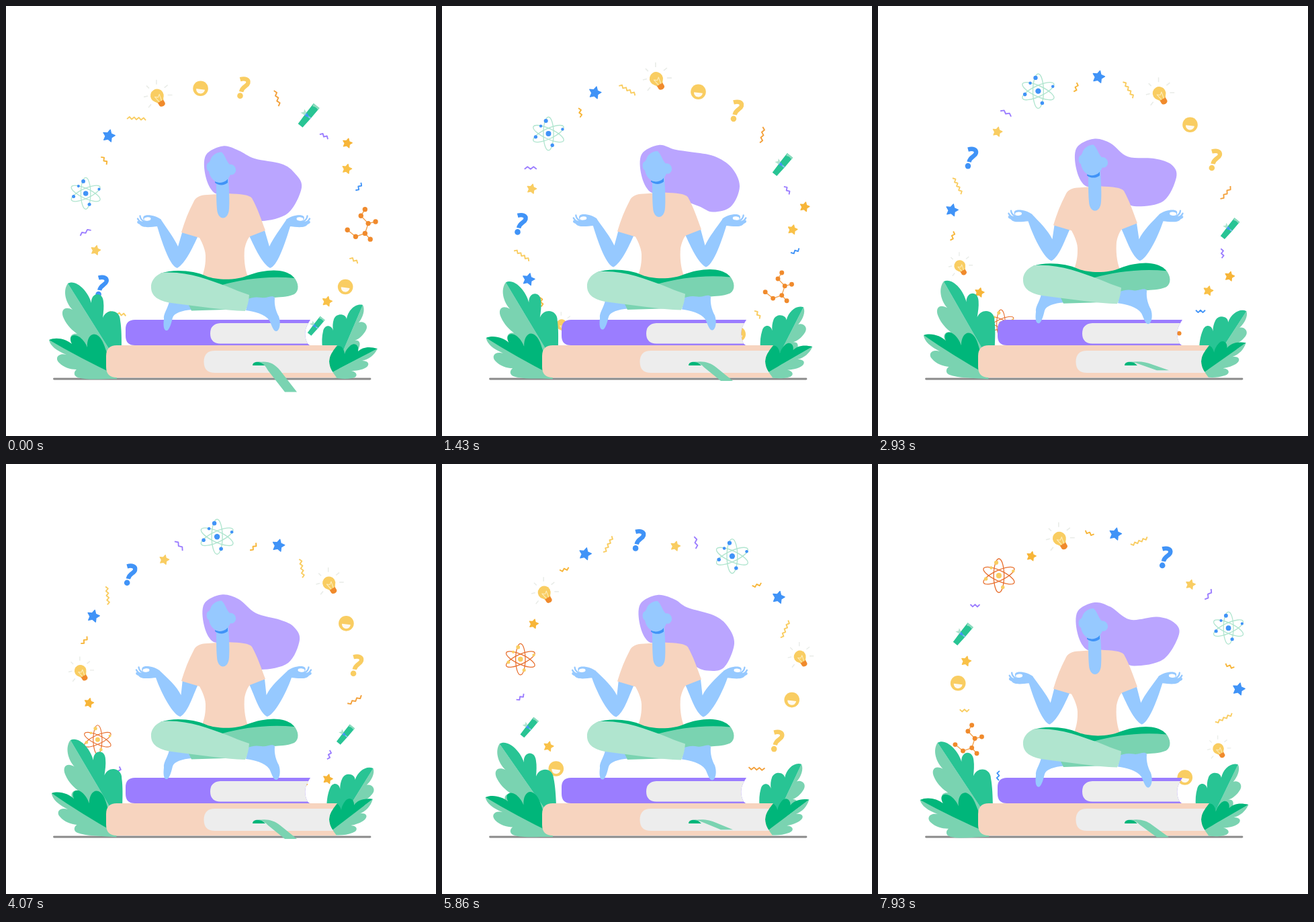
Write an HTML page with a canvas that moves like this. It is 640 by 640 pixels and loops after 8000 ms.

```html
<!DOCTYPE html>
<html lang="en">
<head>
<meta charset="utf-8">
<title>Meditation</title>
<style>
html, body { margin: 0; width: 100%; height: 100%; overflow: hidden; background: #fff; }
canvas { display: block; width: 640px; height: 640px; }
</style>
</head>
<body>
<canvas id="stage"></canvas>
<script>
const canvas = document.getElementById('stage');
const ctx = canvas.getContext('2d');
const dpr = window.devicePixelRatio || 1;
canvas.width = canvas.height = 640 * dpr;

const LOOP = 8000, DEG = Math.PI / 180;
const MINT = '#b0e5cf', LIGHT = '#7ad3b1', MID = '#28c494', DARK = '#00b67a';
const SKIN = '#96c9ff', BLUE = '#4093f7', PURPLE = '#9b7dff', HAIR = '#baa5ff';
const PEACH = '#f7d4bf', PAGE = '#ededed', YELLOW = '#f9cd62', GOLD = '#f7b538', ORANGE = '#f08a2c';

// ---------- helpers ----------
function fill(d, color) {
  ctx.fillStyle = color;
  ctx.fill(new Path2D(d));
}
function line(d, color, width) {
  ctx.strokeStyle = color;
  ctx.lineWidth = width;
  ctx.stroke(new Path2D(d));
}
function oval(x, y, rx, ry, color, rot = 0) {
  ctx.beginPath();
  ctx.ellipse(x, y, rx, ry, rot, 0, 7);
  ctx.fillStyle = color;
  ctx.fill();
}
const dot = (x, y, r, color) => oval(x, y, r, r, color);

function turned(x, y, deg, draw) {
  ctx.save();
  ctx.translate(x, y);
  ctx.rotate(deg * DEG);
  ctx.translate(-x, -y);
  draw();
  ctx.restore();
}

// Smooth interpolation of values given at the pose times
const TIMES = [0, 1430, 2930, 4070, 5860, 6790, 7930];
function pose(t, v) {
  const last = TIMES.length - 1;
  let i = 0;
  while (i < last - 1 && t > TIMES[i + 1]) i++;
  const slope = k => {
    const a = Math.max(k - 1, 0), b = Math.min(k + 1, last);
    return (v[b] - v[a]) / (TIMES[b] - TIMES[a]);
  };
  const h = TIMES[i + 1] - TIMES[i], u = (t - TIMES[i]) / h, w = 1 - u;
  return v[i] * (1 + 2 * u) * w * w + slope(i) * h * u * w * w
    + v[i + 1] * u * u * (3 - 2 * u) - slope(i + 1) * h * u * u * w;
}
// Cosine easing between [time, value] stops
function swing(t, stops) {
  let i = 0;
  while (i < stops.length - 2 && t > stops[i + 1][0]) i++;
  const [t0, a] = stops[i], [t1, b] = stops[i + 1];
  const u = Math.min(1, Math.max(0, (t - t0) / (t1 - t0)));
  return a + (b - a) * (1 - Math.cos(Math.PI * u)) / 2;
}
const easeCubic = u => u < .5 ? 4 * u ** 3 : 1 - 4 * (1 - u) ** 3;

// Closed Catmull-Rom outline
function smooth(pts, color) {
  const n = pts.length, at = i => pts[(i + n) % n];
  ctx.beginPath();
  ctx.moveTo(...pts[0]);
  for (let i = 0; i < n; i++) {
    const [p, a, b, q] = [at(i - 1), at(i), at(i + 1), at(i + 2)];
    ctx.bezierCurveTo(a[0] + (b[0] - p[0]) / 6, a[1] + (b[1] - p[1]) / 6,
      b[0] - (q[0] - a[0]) / 6, b[1] - (q[1] - a[1]) / 6, b[0], b[1]);
  }
  ctx.fillStyle = color;
  ctx.fill();
}

// ---------- floating icons, each drawn around 0,0 ----------
function star(r, color) {
  ctx.beginPath();
  for (let i = 0; i < 10; i++) {
    const a = i * Math.PI / 5 + .25, d = i % 2 ? r * .52 : r;
    ctx.lineTo(Math.sin(a) * d, -Math.cos(a) * d);
  }
  ctx.closePath();
  ctx.fillStyle = ctx.strokeStyle = color;
  ctx.lineWidth = 1.4;
  ctx.fill();
  ctx.stroke();
}
function zigzag(len, teeth, color) {
  ctx.beginPath();
  for (let i = 0; i <= teeth; i++) ctx.lineTo(len * (i / teeth - .5), i % 2 ? -1.7 : 1.7);
  ctx.strokeStyle = color;
  ctx.lineWidth = 1.9;
  ctx.stroke();
}
function bulb() {
  line('M-1,-24V-17 M-20,2L-14,.5 M16,-1H23 M-16,-15L-12,-11 M11,-12L16,-16 M-13,18L-9,13', '#e9ece8', 1.6);
  ctx.rotate(-31 * DEG);
  dot(0, 0, 10, YELLOW);
  fill('M-8,5L-4.6,11H4.6L8,5Z', YELLOW);
  fill('M-4.8,10H4.8V15Q4.5,18 0,18.5Q-4.5,18 -4.8,15Z', ORANGE);
  line('M-2,10L-4,0L0,3L4,0L2,10', '#fdebb5', 1.2);
}
function atom(ring, core) {
  ctx.strokeStyle = ring;
  ctx.lineWidth = 1.4;
  for (const deg of [0, 65, -65]) {
    ctx.beginPath();
    ctx.ellipse(0, 0, 8, 26, deg * DEG, 0, 7);
    ctx.stroke();
  }
  dot(0, 0, 4.2, core);
  dot(-4, -20, 3.2, core);
  dot(-12, -12, 2.3, core);
  dot(22, -7, 2.3, core);
  dot(-20, 5, 2.8, core);
  dot(6, 18, 2.8, core);
}
function smile() {
  dot(0, 0, 11.3, YELLOW);
  ctx.beginPath();
  ctx.arc(0, 1.2, 6.5, .12, Math.PI + .12);
  ctx.fillStyle = '#fffaf0';
  ctx.fill();
}
function question(color) {
  line('M-5.5,-12.5C2,-14.5 7.5,-12.5 6.3,-7C5,-2 -2.5,-2 -4,6', color, 6.4);
  dot(-5.6, 12, 4.3, color);
}
function scroll() {
  ctx.rotate(39 * DEG);
  fill('M-5.5,-19.5H6Q6,0 4.5,19.5H-4.5Q-5.500,0 -5.5,-19.5Z', MID);
  fill('M-5.5,-19.5H6L6,-16Q0,-18 -4,-15Z', '#8fdcbf');
  fill('M-5.5,-2L-11,-4L-9,0L-12,4L-5,3Z', MINT);
  line('M-5.5,1H5.5', '#7fc0f0', 2.2);
  fill('M-4,-2L2,1L-4,4Z', BLUE);
}
function molecule() {
  const nodes = [[6, -26], [-1, -15], [24, -5], [11.5, -2], [6, 15], [-10, 20.5], [-24, 9], [15, 25]];
  for (const [a, b] of [[0, 1], [1, 3], [3, 2], [3, 4], [4, 5], [5, 6], [4, 7]])
    line(`M${nodes[a]}L${nodes[b]}`, '#f3a04a', 1.6);
  for (const [x, y] of nodes) dot(x, y, 4.2, ORANGE);
}

// kind: [draw, grows towards the top]
const plain = draw => ({ draw });
const grows = draw => ({ draw, grow: true });
const zig = (len, teeth, color, tilt) => ({ draw: () => zigzag(len, teeth, color), tilt });

// [icon, start angle from the top, radius, centre shift x, y]
const RING = [
  [grows(bulb), -28.5, 210],
  [zig(28, 8, YELLOW, 45), -41, 199.5],
  [plain(() => star(9.3, BLUE)), -54.1, 212.5],
  [zig(14, 4, GOLD, 117), -63.6, 199],
  [grows(() => atom(MINT, BLUE)), -79.3, 210],
  [zig(18, 4, PURPLE, 68), -95.1, 208],
  [plain(() => star(7.2, YELLOW)), -103.4, 197],
  [plain(() => question(BLUE)), -118.6, 207],
  [zig(27, 8, YELLOW, 139), -131.2, 212.5],
  [plain(() => star(9.3, BLUE)), -141.2, 215.5],
  [zig(14, 4, GOLD, 206), -151.5, 215],
  [grows(bulb), -163.6, 214.5],
  [plain(() => star(7, GOLD)), -176.9, 205],
  [grows(() => atom('#e8702f', YELLOW)), -192.4, 210],
  [zig(14, 4, PURPLE, 240), -208, 210],
  [grows(scroll), 139.3, 209],
  [plain(() => star(7.4, '#f9c148')), 128.5, 195.5],
  [plain(smile), 119, 206],
  [zig(14, 4, YELLOW, -77), 107.3, 202.3],
  [grows(molecule), 93.5, 209.5, -5, -5.5],
  [zig(14, 4, BLUE, 49), 76.4, 206.5],
  [plain(() => star(7.2, '#f9c148')), 67.5, 197.3],
  [plain(() => star(7.2, GOLD)), 58.1, 215.5],
  [zig(14, 4, PURPLE, -20), 50, 194.2],
  [grows(scroll), 38.9, 199],
  [zig(24, 6, '#f3a03a', 50), 23.5, 197.3],
  [plain(() => question(YELLOW)), 8.4, 198.5],
  [plain(smile), -10.3, 198.5],
];

function drawRing(t) {
  for (const [icon, start, r, dx = 0, dy = 0] of RING) {
    const deg = start + t * .01875, a = deg * DEG;
    ctx.save();
    ctx.translate(325 + dx + r * Math.sin(a), 318 + dy - r * Math.cos(a));
    if (icon.tilt !== undefined) ctx.rotate((deg + icon.tilt) * DEG);
    if (icon.grow) {
      const s = .88 + .12 * Math.cos(a);
      ctx.scale(s, s);
    }
    icon.draw();
    ctx.restore();
  }
}

// ---------- scenery ----------
function drawLeaves(t) {
  turned(165, 550, pose(t, [0, 1.2, 2.4, 1.6, -2.7, -2.7, -1.4]), () => {
    fill('M92,413C84,424 89,442 99,452C88,446 80,452 86,465C91,476 99,483 106,488C96,486 92,496 101,504L165,548L172,540Z', LIGHT);
    fill('M92,413C104,406 122,424 127,442C126,426 144,424 145,440C146,448 145,456 144,464C150,449 170,452 170,468C172,480 172,495 172,510V540Z', MID);
  });
  turned(160, 545, pose(t, [0, 1.8, 4.2, 4.2, .6, -1.8, -1.8]), () => {
    fill('M64,497C66,506 75,513 90,519C78,516 72,524 79,531C86,538 96,541 105,541C100,545 101,551 107,553C120,557 140,555 165,555V550Z', LIGHT);
    fill('M64,497C75,492 90,496 98,503C92,492 100,486 110,493C116,498 119,503 121,508C120,495 126,486 134,489C145,494 147,510 152,520L165,550Q110,524 64,497Z', DARK);
  });
  turned(487, 550, pose(t, [0, 3.9, 9.9, 8.8, 2.2, 1.1, 2.7]), () => {
    fill('M531,445C535,452 531,464 525,471C532,468 540,474 536,482C532,490 525,496 519,498C529,496 529,508 520,516L487,548Z', LIGHT);
    fill('M531,445C520,442 509,453 507,466C506,458 492,456 488,466C486,472 486,478 487,483C484,474 474,474 472,484C470,492 470,500 471,510L487,548Z', MID);
  });
  turned(485, 545, pose(t, [0, -2.5, -7.6, -10, -9.3, -6.7, -2.5]), () => {
    fill('M553,510C548,520 540,526 530,528C540,528 542,534 536,538C530,542 520,543 514,543C524,545 524,553 515,554C505,556 495,555 485,552L474,551Z', LIGHT);
    fill('M553,510C540,506 530,508 524,514C526,506 520,500 513,505C508,509 505,514 504,518C503,508 497,503 490,508C479,514 470,530 474,551Z', DARK);
  });
}

function drawBooks(t) {
  fill('M453,467H192Q178,467 178,481V491Q178,505 192,505H452L449,502.5Q441,487 450,472Z', PURPLE);
  fill('M450,472H319Q304,473 304,487.5Q304,502 319,502.5H449Q441,487 450,472Z', PAGE);
  fill('M493,505H165Q149,505 149,521V537Q149,553 165,553H492L487,546Q475,529 487,513Z', PEACH);
  fill('M487,513H311Q294.5,513 294.5,529.5Q294.5,546 311,546H487Q475,529 487,513Z', PAGE);

  const end = swing(t, [[150, 574.5], [2700, 541.5], [4450, 560], [6350, 541.5], [8600, 559]]);
  const d = end - 530;
  fill('M367,535C367,530 372,529 380,530L386,535Z', DARK);
  fill(`M376,530C390,528 399,${530 + .03 * d} 408,${530 + .28 * d}L433,${end}H415L390,${530 + .28 * d}Q384,531 376,530Z`, LIGHT);
}

// ---------- figure ----------
// Moving hair outline: x and y over the pose times
const LOCKS = [
  [[370, 372, 372, 372, 365, 365, 375], [227, 219, 235, 236, 227, 220, 234]],
  [[410, 405, 412, 408, 405, 410, 415], [235, 225, 238, 246, 239, 231, 230]],
  [[429, 431, 437, 428, 425, 431, 440], [248, 242, 247, 256, 255, 248, 238]],
  [[440, 443, 444, 437, 435, 441, 448], [270, 270, 266, 276, 281, 274, 256]],
  [[420, 430, 425, 420, 420, 428, 425], [308, 300, 301, 310, 316, 306, 293]],
  [[381, 403, 385, 380, 395, 404, 382], [320, 308, 309, 320, 321, 312, 303]],
];

function drawArm(p) {
  const e = 4.5 * p, hx = -2 * p, hy = 4 * p;
  fill(`M263,334L286,342C277,361 ${267 + e},383 ${255 + e},390C${245 + e},388 ${234 + hx},358 ${225 + hx},${328 + hy}L${230 + hx},${317 + hy}C240,332 ${250 + e},345 ${256 + e},358Z`, SKIN);
  ctx.save();
  ctx.translate(hx, hy);
  fill('M231,318C224,312 209,309 205,313C203,316 205,319 207,321L196,320C194,322 196,324 199,325C203,331 215,329 226,328Z', SKIN);
  oval(210.5, 317, 5, 2.7, '#fff', -.1);
  ctx.lineCap = 'round';
  line('M199.5,312.5Q200,318 206,321 M196,316.5Q198,321 204,323', SKIN, 2.4);
  ctx.lineCap = 'butt';
  ctx.restore();
}

function drawFigure(t) {
  const u = t / 4800;
  const p = easeCubic(u < 1 ? u : 2 - u);
  ctx.save();
  ctx.translate(0, -14.2 * p);

  const locks = LOCKS.map(([x, y]) => [pose(t, x), pose(t, y)]);
  const [ex, ey] = locks[locks.length - 1];
  const lean = 2.5 * p;
  smooth([[310 - lean, 278], [297 - lean, 253], [297.5 - lean, 222], [323 - lean, 208.5], [346, 215],
    ...locks, [ex - 22, ey - 9], [335, 282]], HAIR);

  drawArm(p);
  ctx.save();
  ctx.translate(648, 0);
  ctx.scale(-1, 1);
  drawArm(p);
  ctx.restore();

  // feet
  fill('M241,436L273,444L277,452C262,453 250,457 248,464C246,472 244,480 240,483C234,484 234,474 235,466C234,458 240,452 243,440Z', SKIN);
  fill('M362,428L398,428L400,435C399,445 402,455 406,462C409,470 408,482 403,484C398,485 396,476 392,468C385,458 370,455 357,453Z', SKIN);

  // shirt, neck and face
  fill('M300,281C288,281 282,285 279,292C272,305 266,320 261,337L288,345C292,352 298,365 297,375C297,388 294,396 291,406C310,412 340,412 360,403C355,390 354,375 355,362C357,352 360,346 363,343L386,334C380,318 374,300 366,286C362,281 350,280 330,279Z', PEACH);
  fill('M313,256L331,256C332,275 333,290 332,302C331,320 315,320 314,302C313,290 313,275 313,256Z', SKIN);
  fill('M311,261C317,264 325,262 330,257V263C324,268 316,267 311,263Z', BLUE);
  fill('M304,230C306,222 314,217 321,217.5C326,222 328,231 333,236C338,235 343,240 342,246C340,251 336,252 334,251C331,258 326,263 318,263C308,262 303,253 302,246C298,245 297,234 302,233Z', SKIN);

  // legs
  fill('M318,414C355,404 395,400 428,403C436,412 437,424 429,429C418,434 405,433 400,434C396,429 388,436 380,434Q368,432 358,437Z', LIGHT);
  fill('M230,398C250,391 280,394 298,402C315,409 345,408 360,401C375,395 395,392 407,394C419,396 426,400 429,405C390,401 350,407 322,415L285,412Z', DARK);
  fill('M271,443L276,453.5L357,451Z', LIGHT);
  fill('M232,397C221,402 215,410 216,420C217,434 230,440 250,442.500C285,447 325,453 356,454Q361,444 362,430C350,426 340,422 328,417C300,407 268,394 232,397Z', MINT);
  ctx.restore();
}

function frame(now) {
  const t = now % LOOP;
  ctx.setTransform(dpr, 0, 0, dpr, 0, 0);
  ctx.lineJoin = 'round';
  ctx.fillStyle = '#fff';
  ctx.fillRect(0, 0, 640, 640);
  drawRing(t);
  ctx.lineCap = 'round';
  line('M71.5,555H542', '#8a8a8a', 2.8);
  ctx.lineCap = 'butt';
  drawLeaves(t);
  drawBooks(t);
  drawFigure(t);
}

const begin = performance.now();
function tick() {
  frame(performance.now() - begin);
  requestAnimationFrame(tick);
}
tick();
</script>
</body>
</html>
```
